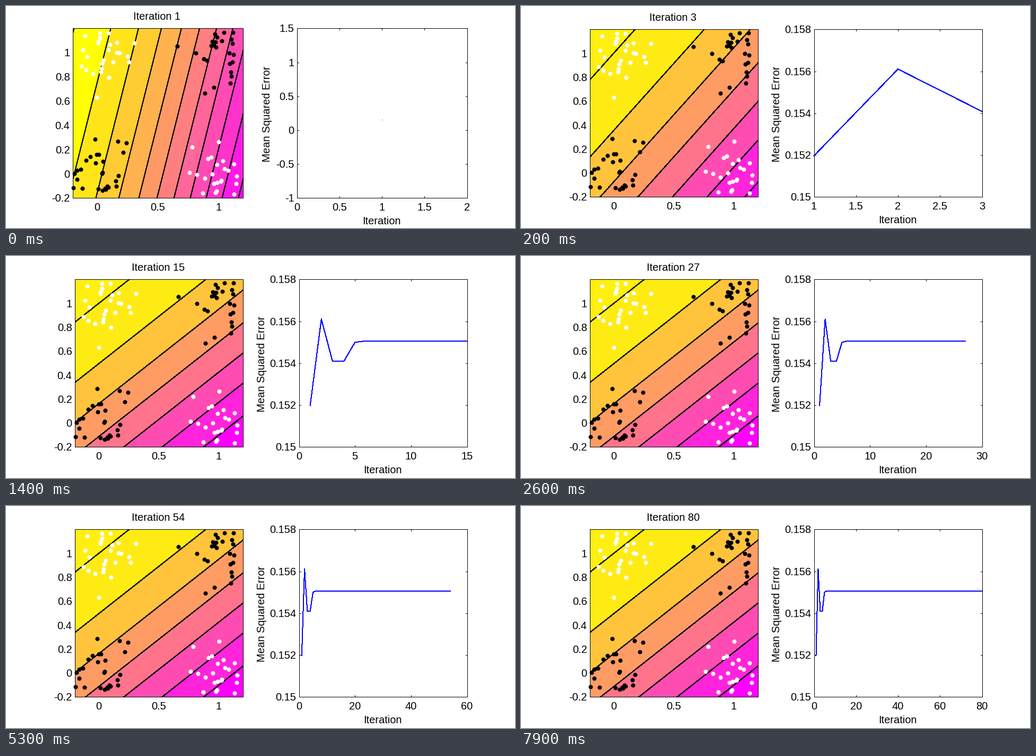
A matplotlib script for the animation above (8 s loop, 960 by 420 pixels).

```python
import numpy as np
import matplotlib.pyplot as plt
from matplotlib.animation import FuncAnimation
from matplotlib.patches import Polygon, Rectangle

W, H, DPI = 960, 420, 100
PX = 72 / DPI  # one pixel in points
FRAMES, INTERVAL = 80, 100

plt.rcParams["font.family"] = "Liberation Sans"
plt.rcParams["font.size"] = 20 * PX

# Sample positions, measured inside a 317 px plot whose corner is at (129, 44)
TOP_LEFT = [
    (180, 52), (196, 52), (152, 57), (180, 61), (178, 67), (177, 71), (211, 70),
    (244, 71), (199, 74), (148, 84), (196, 84), (211, 89), (216, 90), (156, 97),
    (231, 96), (187, 103), (184, 110), (205, 107), (234, 107), (145, 115),
    (183, 119), (154, 122), (167, 128), (182, 125), (197, 135), (174, 173)]
TOP_RIGHT = [
    (411, 51), (428, 51), (394, 54), (398, 60), (425, 64), (407, 67), (389, 68),
    (395, 69), (427, 72), (387, 76), (392, 75), (396, 79), (324, 77), (359, 90),
    (421, 90), (429, 93), (373, 101), (379, 104), (422, 110), (427, 107),
    (424, 125), (425, 133), (423, 146), (392, 154), (375, 165)]
BOTTOM_LEFT = [
    (171, 251), (213, 255), (229, 258), (223, 276), (162, 283), (154, 290),
    (174, 280), (178, 280), (172, 295), (186, 292), (144, 307), (137, 309),
    (132, 315), (137, 326), (185, 313), (184, 315), (214, 319), (209, 329),
    (210, 339), (130, 342), (147, 343), (177, 344), (185, 347), (190, 343),
    (194, 339), (196, 341), (191, 345)]
BOTTOM_RIGHT = [
    (401, 256), (352, 266), (387, 284), (381, 287), (409, 291), (430, 297),
    (398, 298), (412, 306), (419, 309), (347, 313), (361, 317), (375, 324),
    (389, 316), (435, 320), (406, 328), (405, 330), (398, 332), (392, 334),
    (434, 334), (371, 352), (395, 351), (397, 348), (430, 354)]

# Network output as sigmoid((center - u) / scale), u = x + lean * (y - bottom)
FIELDS = [(0.25, 377, 150), (0.5, 310, 152), (0.893, 285, 161),
          (1.12, 240, 168), (1.24, 224, 176), (1.266, 221.4, 178)]
ERRORS = [0.15197, 0.15611, 0.15409, 0.15409, 0.155, 0.15507]

fig = plt.figure(figsize=(W / DPI, H / DPI), dpi=DPI, facecolor="white")
ax = fig.add_axes([0, 0, 1, 1])


def stroke(xs, ys, color="black"):
    return ax.plot(xs, ys, color=color, lw=PX, antialiased=False)[0]


def frame_box(x0, y0, x1, y1):
    stroke([x0, x1, x1, x0, x0], [y0, y0, y1, y1, y0])


def label(x, y, text, ha="center", **kw):
    ax.text(x, y, text, ha=ha, va="baseline", **kw)


def spring(t):
    return (1, t, 1 - t)


def iteration_axis(n):
    """Lower limit, upper limit and tick step after n iterations."""
    if n == 1:
        return 0, 2, 0.5
    if n <= 6:
        return 1, n, {2: 0.2, 3: 0.5}.get(n, 1)
    scales = [(8, 2), (10, 2), (15, 5), (20, 5), (30, 10), (40, 10), (60, 20), (80, 20)]
    hi, step = next(s for s in scales if s[0] >= n)
    return 0, hi, step


def draw_field(n, x0, y0, x1, y1):
    lean, center, scale = FIELDS[min(n, len(FIELDS)) - 1]
    if n == 1:
        step, low, high, cap = 0.05, 0.35, 0.85, 1.0
    else:
        step, low, high, cap = 0.1, 0.209, 0.849, 0.94

    def shade(level):
        return spring(float(np.clip((level - low) / (high - low), 0, cap)))

    area = Rectangle((x0, y0), x1 - x0, y1 - y0, fc=spring(cap), ec="none")
    ax.add_patch(area)
    edges = []
    for level in np.arange(0.9, 0.19, -step):
        bottom = center - scale * np.log(level / (1 - level))
        top = bottom + lean * (y1 - y0)
        if bottom >= x1:
            break
        band = Polygon([(top, y0), (bottom, y1), (2000, y1), (2000, y0)],
                       fc=shade(level - step), ec="none", antialiased=False)
        ax.add_patch(band)
        band.set_clip_path(area)
        edges.append((top, bottom))
    for top, bottom in edges:
        stroke([top, bottom], [y0, y1]).set_clip_path(area)


def draw_samples(x0, y0, side):
    groups = [(TOP_LEFT, "white"), (BOTTOM_RIGHT, "white"),
              (TOP_RIGHT, "black"), (BOTTOM_LEFT, "black")]
    for points, color in groups:
        p = (np.array(points) - (129, 44)) * side / 317 + (x0, y0)
        ax.plot(p[:, 0], p[:, 1], "o", color=color, ms=8 * PX, mew=0)


def draw_classes(n, x0, y0, x1, y1):
    side = x1 - x0
    draw_field(n, x0, y0, x1, y1)
    frame_box(x0, y0, x1, y1)
    draw_samples(x0, y0, side)
    for v in (0, 0.5, 1):
        label(x0 + (v + 0.2) / 1.4 * side, y1 + 24, f"{v:g}")
    for k in range(-1, 6):
        v = k / 5
        label(x0 - 5, y1 - (v + 0.2) / 1.4 * side + 7, f"{v:g}", ha="right")
    label((x0 + x1) / 2 - 1, y0 - 16, f"Iteration {n}")


def draw_error(n, x0, y0, x1, y1):
    lo, hi, step = iteration_axis(n)
    bottom, top, rise = (-1, 1.5, 0.5) if n == 1 else (0.15, 0.158, 0.002)

    def to_x(v):
        return x0 + (v - lo) / (hi - lo) * (x1 - x0)

    def to_y(v):
        return y1 - (v - bottom) / (top - bottom) * (y1 - y0)

    frame_box(x0, y0, x1, y1)
    for v in np.arange(lo, hi + step / 2, step):
        x = to_x(v)
        stroke([x, x], [y1, y1 - 3])
        stroke([x, x], [y0, y0 + 3])
        label(x, y1 + 24, f"{v:g}")
    for v in np.arange(bottom, top + rise / 2, rise):
        y = to_y(v)
        stroke([x0, x0 + 3], [y, y])
        stroke([x1, x1 - 3], [y, y])
        label(x0 - 5, y + 7, f"{round(v, 4):g}", ha="right")

    steps = np.arange(1, n + 1)
    errors = np.array([ERRORS[min(k, len(ERRORS)) - 1] for k in steps])
    if n == 1:
        ax.plot(to_x(steps), to_y(errors), ",", color="blue")
    else:
        stroke(to_x(steps), to_y(errors), "blue")
    label((x0 + x1) / 2 - 1, y1 + 50, "Iteration")
    label(498 if n == 1 else 487, (y0 + y1) / 2 + 1, "Mean Squared Error",
          rotation=90, rotation_mode="anchor")


def update(i):
    n = i + 1
    ax.clear()
    ax.set_axis_off()
    ax.set_xlim(-0.5, W - 0.5)
    ax.set_ylim(H - 0.5, -0.5)
    ax.set_autoscale_on(False)
    if n == 1:
        draw_classes(n, 125, 42, 446, 363)
        draw_error(n, 548, 42, 869, 363)
    else:
        draw_classes(n, 129, 44, 446, 361)
        draw_error(n, 552, 44, 869, 361)
    return []


anim = FuncAnimation(fig, update, frames=FRAMES, init_func=lambda: [],
                     interval=INTERVAL, repeat=True, repeat_delay=0)
plt.show()
```
